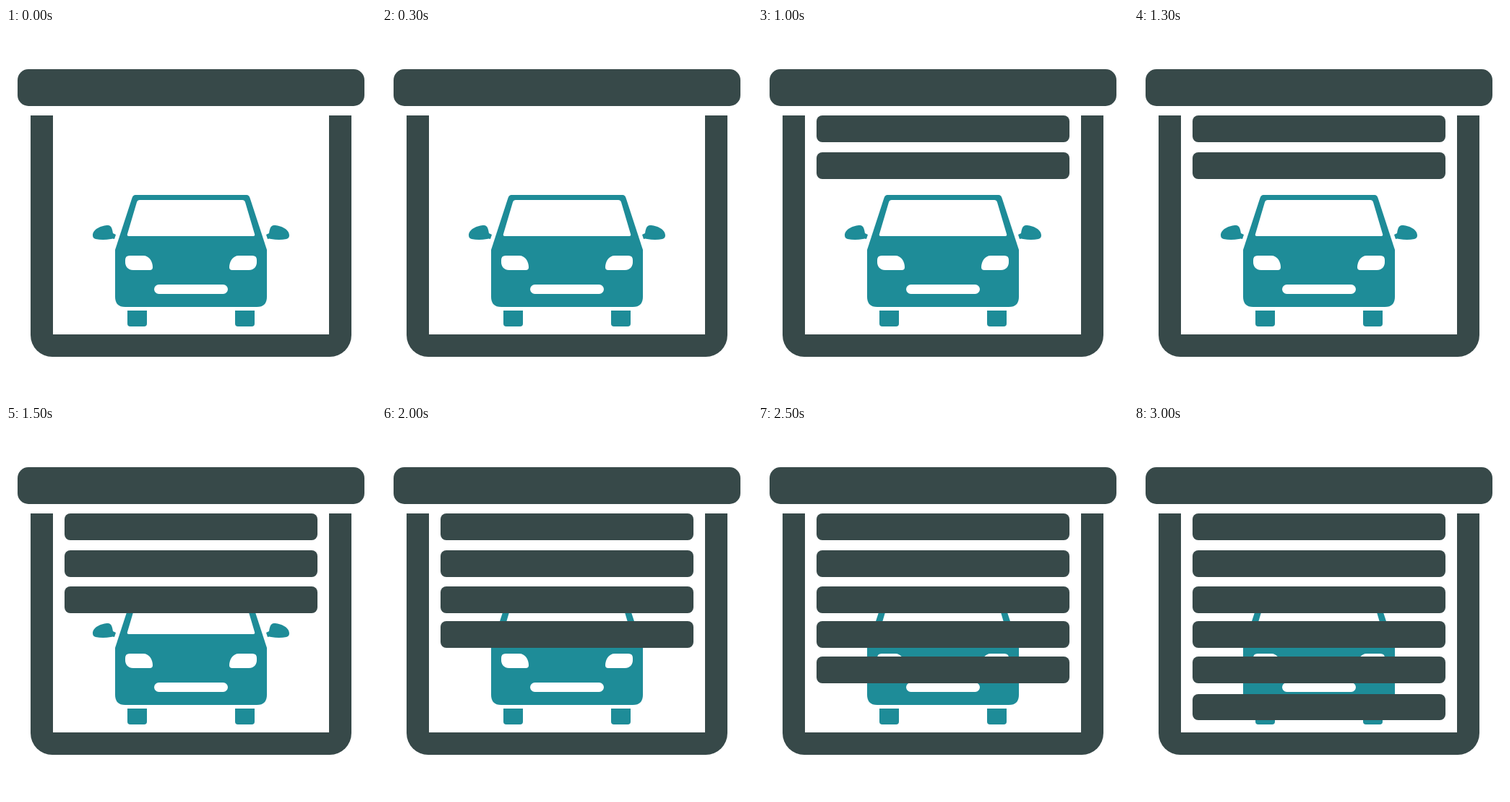
Animation of 512 by 512 pixels, one loop 3.5 s. Source, as an HTML page with a canvas:

```html
<!DOCTYPE html>
<html lang="en">
<head>
<meta charset="utf-8">
<title>Garage door</title>
<style>
  html, body { margin: 0; width: 100%; height: 100%; overflow: hidden; background: #fff; }
  canvas { display: block; }
</style>
</head>
<body>
<canvas id="stage" width="512" height="512"></canvas>
<script>
const ctx = document.getElementById('stage').getContext('2d');
const DARK = '#374949', TEAL = '#1e8c98', WHITE = '#fff';
const STEP = 500;
const SLAT_TOPS = [121, 172, 222, 270, 319, 371];

function box(x, y, w, h, radii, color) {
  ctx.fillStyle = color;
  ctx.beginPath();
  ctx.roundRect(x, y, w, h, radii);
  ctx.fill();
}

function shape(d, color) {
  ctx.fillStyle = color;
  ctx.fill(new Path2D(d));
}

// Draws once as given and once reflected about the vertical centre line.
function mirrored(draw) {
  draw();
  ctx.save();
  ctx.translate(512, 0);
  ctx.scale(-1, 1);
  draw();
  ctx.restore();
}

function drawFrame() {
  box(16, 57, 480, 51, 15, DARK);
  box(34, 121, 444, 334, [0, 0, 30, 30], DARK);
  box(65, 121, 382, 303, 0, WHITE);
}

function drawCar() {
  shape('M179 231H333Q336 231 337.500 235L361 307V372Q361 386 347 386H165Q151 386 151 372V307L174.500 235Q176 231 179 231Z', TEAL);
  shape('M185 238H327Q330 238 331 241L344 285Q345 288 342 288H170Q167 288 168 285L181 241Q182 238 185 238Z', WHITE);
  box(205, 355, 102, 13, 6.5, WHITE);
  mirrored(() => {
    shape('M171 315H190C198 315 203 323 203 331Q203 335 199 335H176C168 335 165 329 165 324V321Q165 315 171 315Z', WHITE);
    shape('M120 287C120 278 133 273 141 273C146 273 147 278 148 284L152 286L150 292Q148 291 145 292Q134 294 124 292Q120 291 120 287Z', TEAL);
    box(168, 391, 27, 22, [0, 0, 4, 4], TEAL);
  });
}

function render(now) {
  const count = Math.floor(now / STEP) % (SLAT_TOPS.length + 1);
  ctx.fillStyle = WHITE;
  ctx.fillRect(0, 0, 512, 512);
  drawFrame();
  drawCar();
  for (const y of SLAT_TOPS.slice(0, count)) {
    box(81, y, 350, y === 371 ? 36 : 37, 8, DARK);
  }
}

const start = performance.now();
function tick() {
  render(performance.now() - start);
  requestAnimationFrame(tick);
}
tick();
</script>
</body>
</html>
```
